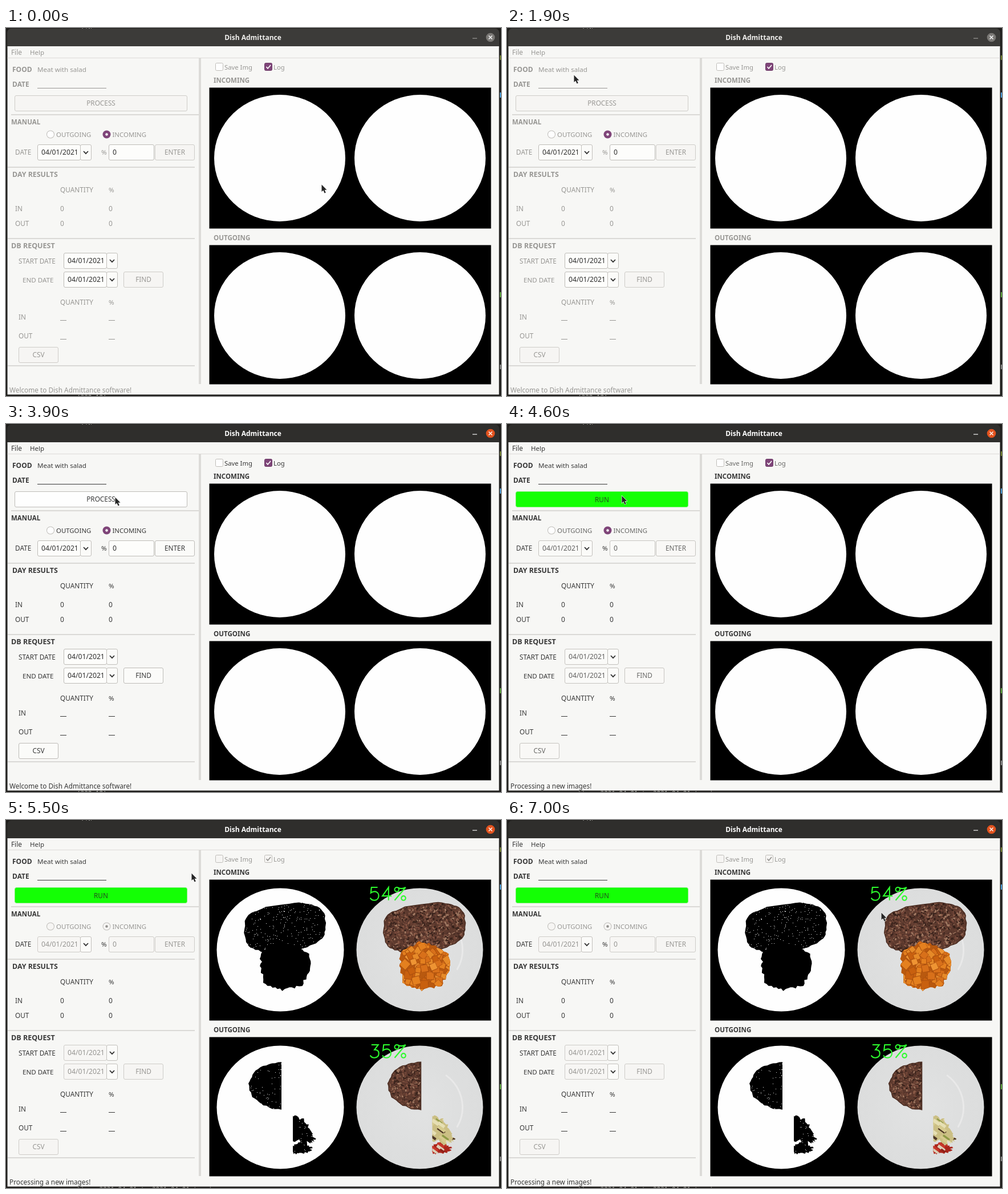
An HTML page with a canvas for the animation above (8000 ms loop, 868x645 px).

```html
<!DOCTYPE html>
<html lang="en">
<head>
<meta charset="utf-8">
<title>Dish Admittance</title>
<style>
  html, body { margin: 0; width: 100%; height: 100%; overflow: hidden; background: #1e1d1b; }
  canvas { display: block; width: 868px; height: 645px; }
</style>
</head>
<body>
<canvas id="stage" width="868" height="645"></canvas>
<script>
const g = document.getElementById('stage').getContext('2d');
const LOOP = 8000, STEP = 100;
const FOCUS = 2900, PRESS = 4500, RESULT = 5500;
const APP = 'Dish Admittance';
const SANS = '"Noto Sans", "Open Sans", sans-serif';
const PHOTO_DX = 244.5;

// Pointer moves; "via" bends the way into an arc
const HOME = [553, 274];
const MOVES = [
  { from: 0, until: 300, to: [454, 137], via: [552, 320] },
  { from: 400, until: 1100, to: [230, 128], via: [680, -30] },
  { from: 1200, until: 1700, to: [112, 82], via: [130, 65] },
  { from: 1800, until: 1900, to: [117, 82] },
  { from: 2100, until: 2400, to: [210, 78] },
  { from: 2500, until: 2700, to: [215, 81] },
  { from: 2900, until: 3600, to: [191, 128] },
  { from: 4500, until: 5100, to: [325, 93] },
  { from: 5700, until: 6100, to: [391, 87], via: [400, 62] },
  { from: 6200, until: 7000, to: [656, 162], via: [1010, 440] }
];

const clamp = v => Math.max(0, Math.min(1, v));
const ramp = (t, from, len) => clamp((t - from) / len);
const ease = k => k * k * (3 - 2 * k);
const mix = (a, b, k) => `rgb(${a.map((v, i) => Math.round(v + (b[i] - v) * k))})`;
const ink = k => mix([152, 151, 148], [56, 56, 56], k);
const edge = k => mix([206, 204, 200], [190, 188, 184], k);

function makeRandom(seed) {
  return () => {
    seed = (seed + 0x6D2B79F5) | 0;
    let r = Math.imul(seed ^ (seed >>> 15), 1 | seed);
    r = (r + Math.imul(r ^ (r >>> 7), 61 | r)) ^ r;
    return ((r ^ (r >>> 14)) >>> 0) / 4294967296;
  };
}
const pick = (list, rnd) => list[Math.floor(rnd() * list.length)];

function pointerAt(t) {
  let pos = HOME;
  for (const { from, until, to, via } of MOVES) {
    if (t <= from) break;
    const k = ease(ramp(t, from, until - from)), start = pos;
    pos = to.map((end, i) => {
      const bend = via ? via[i] : (start[i] + end) / 2;
      return start[i] * (1 - k) ** 2 + 2 * bend * k * (1 - k) + end * k * k;
    });
  }
  return pos;
}

// ---- basic drawing ----
function rect(x, y, w, h, color) {
  g.fillStyle = color;
  g.fillRect(x, y, w, h);
}

// y is the middle of the capitals
function text(s, x, y, color, size = 11.8, weight = 400, align = 'left') {
  g.font = `${weight} ${size}px ${SANS}`;
  g.textAlign = align;
  g.fillStyle = color;
  g.fillText(s, x, y + size * 0.357);
}
const bold = (s, x, y, color, size = 12, align) => text(s, x, y, color, size, 700, align);

function box(x, y, w, h, fill, stroke, r = 2.5) {
  g.beginPath();
  g.roundRect(x + 0.5, y + 0.5, w - 1, h - 1, r);
  g.fillStyle = fill;
  g.fill();
  g.strokeStyle = stroke;
  g.lineWidth = 1;
  g.stroke();
}

function oval(x, y, rx, ry, fill) {
  g.beginPath();
  g.ellipse(x, y, rx, ry, 0, 0, Math.PI * 2);
  g.fillStyle = fill;
  g.fill();
}

function line(points, color, width) {
  g.beginPath();
  points.forEach(([x, y]) => g.lineTo(x, y));
  g.strokeStyle = color;
  g.lineWidth = width;
  g.stroke();
}

// ---- food ----
// Ragged superellipse, cut at the vertical lines "min" and "max"
function blob({ x, y, rx, ry, power = 2, tilt = 0, jag = 3, seed, min = 0, max = 868 }) {
  const rnd = makeRandom(seed), path = new Path2D(), n = 64;
  const bow = v => Math.sign(v) * Math.abs(v) ** (2 / power);
  let bump = 0;
  for (let i = 0; i < n; i++) {
    const a = i / n * Math.PI * 2;
    bump = bump * 0.5 + (rnd() - 0.5) * jag;
    const u = bow(Math.cos(a)) * (rx + bump), v = bow(Math.sin(a)) * (ry + bump);
    const px = x + u * Math.cos(tilt) - v * Math.sin(tilt);
    path.lineTo(Math.max(min, Math.min(max, px)), y + u * Math.sin(tilt) + v * Math.cos(tilt));
  }
  path.closePath();
  return { path, x, y, rx, ry };
}

const steak = blob({ x: 489, y: 189, rx: 72, ry: 41, power: 2.7, tilt: -0.12, seed: 3 });
const squash = blob({ x: 489, y: 256, rx: 45, ry: 42, jag: 7, seed: 14 });
const halfSteak = blob({ x: 483, y: 466, rx: 57, ry: 41, max: 483, seed: 5 });
const veg = blob({ x: 515, y: 546, rx: 31, ry: 19, tilt: 0.6, jag: 10, min: 503, seed: 6 });
const pepper = blob({ x: 515, y: 576, rx: 21, ry: 9, jag: 5, min: 503, seed: 7 });

// Calls draw(x, y, rnd) at random places, clipped to the food
function scatter(food, count, seed, draw) {
  const rnd = makeRandom(seed);
  g.save();
  g.clip(food.path);
  for (let i = 0; i < count; i++) {
    draw(food.x + (rnd() * 2 - 1) * food.rx, food.y + (rnd() * 2 - 1) * food.ry * 1.1, rnd);
  }
  g.restore();
}

function fillFood(food, color) {
  g.fillStyle = color;
  g.fill(food.path);
}

function mask(food, count) {
  fillFood(food, '#000');
  scatter(food, count, 9, (x, y) => rect(Math.floor(x), Math.floor(y), 1, 1, '#eee'));
}

function meat(food, count) {
  const tones = ['#3d261e', '#75483a', '#8c5c48', '#321e18', '#52322a', '#6a4234', '#a27a63'];
  fillFood(food, '#5d3a2e');
  scatter(food, count, 21, (x, y, rnd) => {
    const a = rnd() * 6.3, len = 2 + rnd() * 4;
    line([[x, y], [x + Math.cos(a) * len, y + Math.sin(a) * len]], pick(tones, rnd), 1 + rnd() * 2);
  });
  g.strokeStyle = '#4a2d22';
  g.lineWidth = 1.5;
  g.stroke(food.path);
}

function cubes() {
  const tones = ['#e4801f', '#d8701a', '#ee9433', '#c8600f', '#e68a28'];
  fillFood(squash, '#b9590f');
  scatter(squash, 90, 5, (x, y, rnd) => {
    const s = 10 + rnd() * 5;
    g.save();
    g.translate(x, y);
    g.rotate(rnd() * 3);
    rect(-s / 2, -s / 2, s, s, '#a94e0e');
    rect(-s / 2 + 0.6, -s / 2 + 0.6, s - 1.6, s - 1.6, pick(tones, rnd));
    g.restore();
  });
}

function slices(food, base, tones, count) {
  fillFood(food, base);
  scatter(food, count, 8, (x, y, rnd) =>
    line([[x - 6, y - 4], [x + 5, y + 4]], pick(tones, rnd), 2 + rnd() * 4));
}

function plate(x, y) {
  const shade = g.createRadialGradient(x, y, 15, x, y, 112);
  shade.addColorStop(0, '#e1e2e2');
  shade.addColorStop(0.7, '#dddede');
  shade.addColorStop(1, '#dcdddd');
  oval(x, y, 111, 108, shade);
  g.lineCap = 'round';
  g.lineWidth = 3;
  g.strokeStyle = '#e9e9e9';
  g.beginPath();
  g.ellipse(x, y, 75, 71, 0, -0.9, 0.5);
  g.stroke();
  g.lineCap = 'butt';
}

// Single-stroke digits on a 21 unit tall grid
const RING = 'a3.5 3.5 0 1 1-7 0a3.5 3.5 0 1 1 7 0';
const STROKES = {
  3: 'M5-12H16L10-4Q17-4 17 2T10 9Q5 9 3 5',
  4: 'M13 9V-12L3 2H18',
  5: 'M15-12H5L4-3Q8-6 12-5A7.2 7.2 0 0 1 10 9Q5 9 3 5',
  '%': `M21-12L3 9M10-8.5${RING}M8-12Q14-8 21-12M21 5.5${RING}`
};

function percent(s, y) {
  g.save();
  g.translate(635.5, y);
  g.scale(1.07, 1.08);
  g.strokeStyle = '#2dfb2d';
  g.lineWidth = 2;
  for (const c of s) {
    g.stroke(new Path2D(STROKES[c]));
    g.translate(20, 0);
  }
  g.restore();
}

function pictures(done) {
  rect(356.5, 104.5, 494, 247, '#000');
  rect(356.5, 380.5, 494, 244, '#000');
  for (const y of [228, 504]) {
    if (done) {
      oval(481, y - 0.5, 111.5, 108, '#fefefe');
      plate(725.5, y - 0.5);
    } else {
      oval(480, y, 115, 111, '#fefefe');
      oval(726, y, 115, 111, '#fefefe');
    }
  }
  if (!done) return;
  mask(steak, 260);
  mask(squash, 0);
  mask(halfSteak, 150);
  mask(veg, 25);
  mask(pepper, 8);
  g.save();
  g.translate(PHOTO_DX, 0);
  meat(steak, 1500);
  cubes();
  meat(halfSteak, 1100);
  slices(veg, '#cbbf84', ['#e6dfb4', '#d6cb8e', '#8d9a45', '#4f3826'], 22);
  slices(pepper, '#a9261c', ['#c8382b', '#8d1d16', '#dccfb8'], 10);
  g.restore();
  percent('54%', 131);
  percent('35%', 407);
}

// ---- widgets ----
function button(label, x, y, w, k, fill) {
  box(x, y, w, 28, fill || mix([246, 245, 243], [251, 251, 249], k), edge(k));
  text(label, x + w / 2, y + 14, ink(k), 11.8, 400, 'center');
}

function entry(s, x, y, w, run) {
  box(x, y, w, 28, mix([253, 253, 251], [247, 246, 244], run), edge(1 - run));
  text(s, x + 7, y + 14, mix([45, 45, 45], [150, 149, 146], run), 12.2);
}

function dateBox(x, y, run) {
  entry('04/01/2021', x, y, 76, run);
  box(x + 75, y, 20, 28, '#fbfbf9', '#c2c0bc');
  line([[x + 81, y + 12], [x + 85, y + 16.2], [x + 89, y + 12]], '#2f2f2f', 1.8);
}

function radio(label, x, on, k, run) {
  const off = run > 0.5;
  oval(x, 186.5, 7, 7, on && !off ? '#7f4579' : '#bfbdb9');
  if (!on || off) oval(x, 186.5, 6, 6, off ? '#f6f5f3' : '#fefefe');
  if (on) oval(x, 186.5, 2.2, 2.2, off ? '#92918e' : '#fff');
  text(label, x + 10, 186.5, ink(k), 11.4);
}

function check(label, x, on, k, run) {
  const off = run > 0.5, purple = on && !off;
  box(x, 61, 14, 14, purple ? '#7f4579' : off ? '#f6f5f3' : '#fefefe',
    purple ? '#6d3a67' : '#bfbdb9', 2);
  if (on) line([[x + 3.5, 68], [x + 6, 71], [x + 11, 65]], off ? '#92918e' : '#fff', 1.7);
  text(label, x + 16, 68.5, ink(k), 11.3);
}

// Slivers of the terminal and editor around the window
function behind(run) {
  rect(0, 0, 868, 645, '#1e1d1b');
  g.font = '11px "Noto Sans Mono", monospace';
  g.textAlign = 'left';
  g.fillStyle = '#a5a5a0';
  g.fillText('270', 131, 3);
  g.fillText(run ? 'time: 2021-04-01 to 2021-04-01 two images' : '(220,10)', 124, 651);
  rect(866, 48, 2, 8, '#6f7f2c');
  rect(866, 113, 2, 9, '#4a9bd8');
  rect(866, 463, 2, 9, '#5aa43a');
  rect(866, 590, 2, 8, '#858585');
}

function titleBar(focused) {
  g.beginPath();
  g.roundRect(2, 1, 863, 34, [7, 7, 0, 0]);
  g.fillStyle = focused ? '#2f2e2c' : '#3c3b39';
  g.fill();
  bold(APP, 433, 17, focused ? '#fff' : '#f0efed', 12, 'center');
  rect(818, 17.5, 8, 1.2, focused ? '#f2f2f2' : '#9a9996');
  oval(849.5, 16.5, 7.8, 7.8, focused ? '#e2531f' : '#7b7976');
  for (const d of [-3, 3]) line([[849.5 - d, 13.5], [849.5 + d, 19.5]], '#fbfbfb', 1.4);
}

function processButton(t, on, run, hover) {
  if (run > 0) {
    box(15, 118, 303, 28, '#14ff05', '#74f06c', 3);
    text('RUN', 166.5, 132.5, '#234f1f', 11.8, 400, 'center');
  } else {
    button('PROCESS', 15, 118, 303, on, t >= PRESS ? '#dddbd8' : hover && '#fefefe');
  }
}

// Result rows: headings, then one value under each for IN and OUT
function results(x, top, rows, c, value) {
  text('QUANTITY', 95, top, c);
  text('%', 180, top, c, 11.5);
  ['IN', 'OUT'].forEach((name, i) => {
    text(name, x, rows[i], c);
    for (const col of [95, 180]) value(col, rows[i]);
  });
}

function leftPane(t, on, run, hover) {
  const c = ink(on), live = on * (1 - run);
  rect(9, 151, 329, 2, '#dad9d6');
  for (const y of [243, 368, 591]) rect(3, y, 328, 2, '#dad9d6');

  bold('FOOD', 11, 72.5, c);
  text('Meat with salad', 55, 73, c, 11.6);
  bold('DATE', 11, 98.5, c);
  rect(55, 105, 121, 1, c);
  processButton(t, on, run, hover);

  bold('MANUAL', 9, 164.5, c, 11.5);
  radio('OUTGOING', 78, false, live, run);
  radio('INCOMING', 176.5, true, live, run);
  text('DATE', 16, 218, c);
  dateBox(55, 204, run);
  text('%', 167, 218, c, 11.5);
  entry('0', 180, 204, 80, run);
  button('ENTER', 261, 204, 70, live);

  bold('DAY RESULTS', 11, 256.5, c, 12.4);
  results(16, 283.5, [316.5, 343], c, (x, y) => text('0', x, y, c, 12));

  bold('DB REQUEST', 9, 381.5, c, 12.5);
  text('START DATE', 22, 408.5, c);
  dateBox(101, 394, run);
  text('END DATE', 29, 441.5, c, 11.6);
  dateBox(101, 427, run);
  button('FIND', 206, 427, 70, live);
  results(22, 481, [507, 540], c, (x, y) => rect(x, y + 5, 11, 1, c));
  button('CSV', 22, 559, 70, live);
}

function pointer(x, y) {
  const arrow = new Path2D('M0 0V12.6L2.9 9.9L5.1 15L7.3 14L5.1 9.2H9Z');
  g.save();
  g.translate(x + 0.5, y + 0.5);
  g.lineJoin = 'round';
  g.strokeStyle = 'rgba(255,255,255,.8)';
  g.lineWidth = 1.5;
  g.stroke(arrow);
  g.fillStyle = '#252525';
  g.fill(arrow);
  g.restore();
}

function draw(t) {
  const on = ramp(t, FOCUS, 200), run = ramp(t, PRESS, 200);
  const live = on * (1 - run), [x, y] = pointerAt(t);
  const hover = on > 0 && x >= 15 && x < 318 && y >= 118 && y < 146;

  behind(run > 0);
  titleBar(t >= FOCUS);
  rect(2.5, 32, 862, 610.5, '#f7f7f5');
  rect(2.5, 52, 862, 1, '#dcdad7');
  text('File', 9, 43, ink(on));
  text('Help', 42, 43, ink(on), 11.5);
  rect(338, 53, 4, 571, '#dcdbd8');

  leftPane(t, on, run, hover);
  check('Save Img', 367, false, live, run);
  check('Log', 453, true, live, run);
  bold('INCOMING', 364, 92, ink(on), 11.5);
  bold('OUTGOING', 364, 368, ink(on), 11.6);
  pictures(t >= RESULT);
  text(run > 0 ? 'Processing a new images!' : `Welcome to ${APP} software!`, 6, 634.5, ink(on));
  pointer(x, y);
}

const start = performance.now();
let shown = -1;
function tick() {
  const t = Math.floor(((performance.now() - start) % LOOP) / STEP) * STEP;
  if (t !== shown) draw(shown = t);
  requestAnimationFrame(tick);
}
tick();
</script>
</body>
</html>
```
